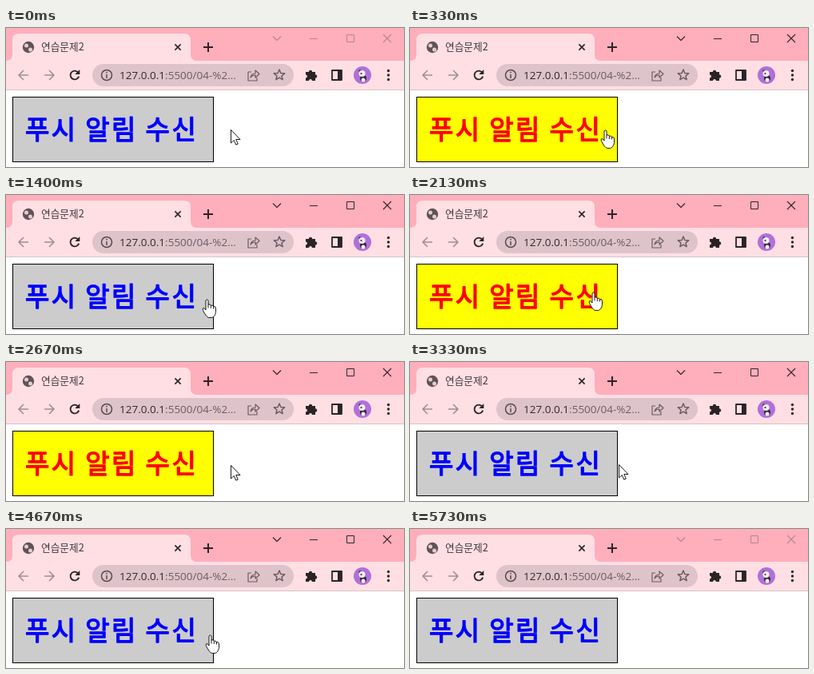
Animation of 498x174 px, one loop 5.79 s. Source, as an HTML page with a canvas:

```html
<!DOCTYPE html>
<html lang="ko">
<head>
<meta charset="utf-8">
<style>
html, body { margin: 0; width: 100%; height: 100%; overflow: hidden; background: #fff; }
canvas { display: block; }
</style>
</head>
<body>
<canvas id="stage" width="498" height="174"></canvas>
<script>
const ctx = document.getElementById('stage').getContext('2d');
const LOOP = 5790, STEP = 200 / 3, GLIDE = 3;
const KOREAN = '"Noto Sans CJK KR", "Noto Sans CJK JP", "Noto Sans CJK", sans-serif';
const INK = '#2b2427', SOFT = '#6d5b62', BAR = '#ffdfe4', TITLE = '#ffaebb';

// The pointer jumps to `at`, drifts inward and back, then glides out to `rest`.
const visits = [
  { enter: 0, leave: 1, at: [282, 128], rest: [262, 128] },
  { enter: 4, leave: 9, at: [253, 128], rest: [315, 129] },
  { enter: 21, leave: 24, at: [252, 131], rest: [288, 126] },
  { enter: 32, leave: 37, at: [230, 122], rest: [282, 130] },
  { enter: 42, leave: 47, at: [252, 129], rest: [262, 129] },
  { enter: 59, leave: 64, at: [252, 134], rest: [274, 134] },
  { enter: 70, leave: 75, at: [256, 133], rest: [270, 180] }
];
const focus = { from: 3, to: 86 };

const clamp = v => Math.min(1, Math.max(0, v));
const smooth = v => v * v * (3 - 2 * v);

function pointerAt(step, { enter, leave, at, rest }) {
  const drift = 14 * Math.sin(Math.PI * clamp((step - enter) / (leave - enter)));
  const out = smooth(clamp((step - leave) / GLIDE));
  const [x, y] = at.map((a, i) => a + (rest[i] - a) * out);
  return [Math.round(x - drift), Math.round(y)];
}

function rect(x, y, w, h, color) {
  ctx.fillStyle = color;
  ctx.fillRect(x, y, w, h);
}

function disc(x, y, r, color) {
  ctx.fillStyle = color;
  ctx.beginPath();
  ctx.arc(x, y, r, 0, Math.PI * 2);
  ctx.fill();
}

function stroke(d, color = INK, width = 1.5) {
  ctx.strokeStyle = color;
  ctx.lineWidth = width;
  ctx.stroke(new Path2D(d));
}

function fill(d, color) {
  ctx.fillStyle = color;
  ctx.fill(new Path2D(d));
}

function cross(x, y, r, color, width) {
  stroke(`M${x - r} ${y - r}l${2 * r} ${2 * r}m0 ${-2 * r}l${-2 * r} ${2 * r}`, color, width);
}

function arrow(x, y, dir, color) {
  stroke(`M${x - 6 * dir} ${y}h${12 * dir}m${-6 * dir} -6l${6 * dir} 6l${-6 * dir} 6`, color, 1.6);
}

function text(str, x, y, font, color) {
  ctx.font = font;
  ctx.fillStyle = color;
  ctx.fillText(str, x, y);
  return x + ctx.measureText(str).width;
}

function drawTitleBar(active) {
  rect(0, 0, 498, 41, TITLE);
  fill('M0 41Q8 41 8 33V15Q8 7 16 7H223Q231 7 231 15V33Q231 41 239 41Z', BAR);
  disc(28, 24, 7.2, '#5f5358');
  disc(25.5, 22, 2.5, '#e5cdd2');
  disc(30.5, 27, 2.5, '#e5cdd2');
  text('연습문제2', 44, 28, '12.7px ' + KOREAN, '#43383c');
  cross(215, 24, 3.6, INK, 1.6);
  stroke('M247 24h12m-6 -6v12', INK, 2);
  const color = active ? '#30272a' : '#b9858f';
  stroke('M334 10.5l5 5l5 -5', color, 1.1);
  stroke('M380 13.5h10M426.5 8.5h9v9h-9Z', color, 1);
  cross(477, 13, 5, color, 1.1);
}

function drawToolbar() {
  rect(0, 41, 498, 36, BAR);
  rect(0, 77, 498, 1, '#d6c3c7');
  arrow(22, 59, -1, '#a18e94');
  arrow(54, 59, 1, '#a18e94');
  ctx.beginPath();
  ctx.arc(86, 59, 5.4, 0.3, 5.5);
  ctx.strokeStyle = INK;
  ctx.lineWidth = 1.9;
  ctx.stroke();
  fill('M92.3 52v6h-6Z', INK);

  ctx.fillStyle = '#dec4ca';
  ctx.beginPath();
  ctx.roundRect(108, 45, 252, 28, 14);
  ctx.fill();
  stroke('M132.5 59a6.5 6.5 0 1 0 -13 0a6.5 6.5 0 1 0 13 0M126 58v5m0 -8.2v1.6', '#5a4b51');
  const font = '13.5px "Open Sans", "Noto Sans", sans-serif';
  const end = text('127.0.0.1', 142, 64, font, '#33292d');
  text(':5500/04-%2...', end, 64, font, SOFT);

  stroke('M307 55h-4v11h11v-4M306 62q1 -5 6 -5v-4l5 4.5l-5 4.5v-3q-4 0 -6 3Z', SOFT, 1.2);
  drawStar(342, 59, 7);
  drawPuzzle(375, 55);
  stroke('M408 53h12v12h-12Z', INK, 1.8);
  rect(415, 53, 5, 12, INK);
  drawAvatar(446, 59);
  for (let i = -1; i <= 1; i++) disc(478.5, 59 + i * 5.5, 1.7, INK);
}

function drawStar(cx, cy, r) {
  let d = 'M';
  for (let i = 0; i < 10; i++) {
    const a = i * Math.PI / 5 - Math.PI / 2, q = i % 2 ? r * 0.45 : r;
    d += `${cx + q * Math.cos(a)} ${cy + q * Math.sin(a)} `;
  }
  stroke(d + 'Z', SOFT, 1.5);
}

function drawPuzzle(x, y) {
  rect(x, y, 12, 11, INK);
  disc(x + 6, y, 2.2, INK);
  disc(x + 12, y + 5.5, 2.2, INK);
  disc(x, y + 5.5, 1.9, BAR);
  disc(x + 6, y + 11, 1.9, BAR);
}

function drawAvatar(x, y) {
  disc(x, y, 11, '#b070d8');
  disc(x + 1, y + 4, 4, '#33293b');
  disc(x - 3, y - 5, 1.7, '#33293b');
  disc(x - 0.5, y - 2, 4, '#f4eef5');
  disc(x + 1, y + 6, 2.5, '#f4eef5');
  disc(x - 1.5, y - 2, 1.1, '#33293b');
}

function drawBox(on) {
  rect(8, 86, 252, 82, '#000');
  rect(9, 87, 250, 80, on ? '#ff0' : '#ccc');
  const label = '푸시 알림 수신', color = on ? '#f00' : '#00f';
  ctx.letterSpacing = '2.4px';
  ctx.lineJoin = 'round';
  text(label, 24, 139, '33px ' + KOREAN, color);
  ctx.strokeStyle = color;
  ctx.lineWidth = 1.4;
  ctx.strokeText(label, 24, 139);
  ctx.letterSpacing = '0px';
}

function drawPointer(x, y) {
  const hand = x < 260 && y < 168;
  const shape = hand
    ? 'M-1.5 1.5Q0 -1 1.5 1.5V6.5Q4 5.5 4.8 7.8Q7.3 6.8 8 9Q11 8.5 11 11.5V16Q10 22 6 23H2Q-1 22 -5 14Q-6 11 -4.5 11Q-3 11 -1.5 13.5Z'
    : 'M0 0V16.5L3.8 13L6.3 18.7L8.8 17.6L6.3 12H11.5Z';
  ctx.save();
  ctx.translate(x - 0.5, y - 0.5);
  ctx.lineJoin = 'round';
  fill(shape, '#fff');
  stroke(shape, '#000', 0.9);
  if (hand) stroke('M1.5 6.5v4.5M4.8 7.8v3.7M8 9v3', '#000', 0.9);
  ctx.restore();
}

function draw(now) {
  const step = Math.floor((now % LOOP + 4) / STEP);
  const begun = visits.filter(v => v.enter <= step);
  rect(0, 0, 498, 174, '#fff');
  drawTitleBar(step >= focus.from && step < focus.to);
  drawToolbar();
  drawBox(begun.length % 2 === 0); // every new visit flips the colours
  drawPointer(...pointerAt(step, begun[begun.length - 1]));
}

const start = performance.now();
function tick() {
  draw(performance.now() - start);
  requestAnimationFrame(tick);
}
tick();
</script>
</body>
</html>
```
